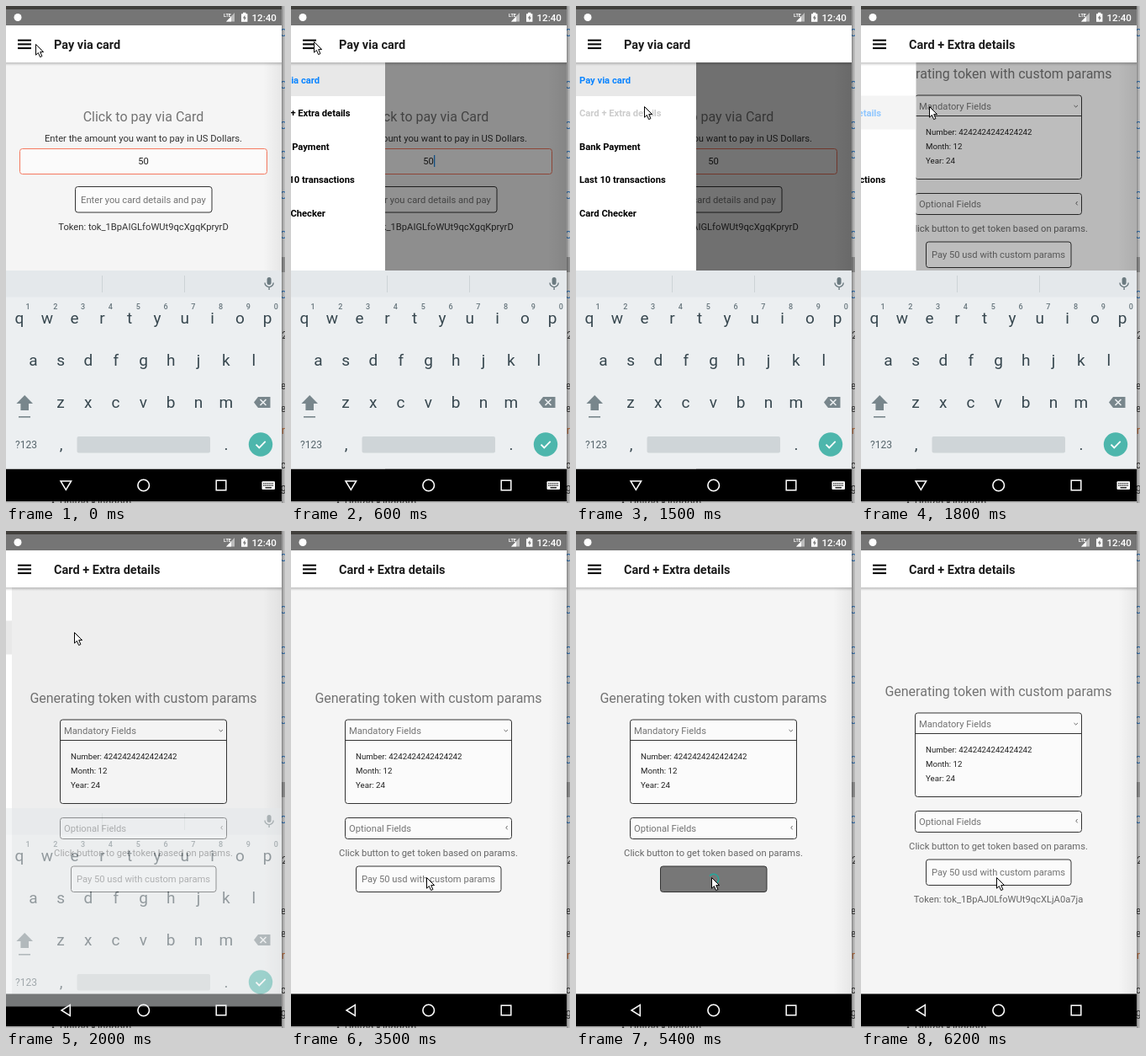
Write an HTML page that moves like this. It is 332 px wide and 590 px high and loops after 8 s.

```html
<!DOCTYPE html>
<html lang="en">
<head>
<meta charset="utf-8">
<title>Card payment demo</title>
<style>
  html, body { margin: 0; width: 100%; height: 100%; overflow: hidden; }
  svg { display: block; width: 332px; height: 590px; font-family: Roboto, "Noto Sans", sans-serif; }
  text { white-space: pre; }
</style>
</head>
<body>
<svg id="stage" viewBox="0 0 332 590" xmlns="http://www.w3.org/2000/svg"></svg>
<script>
const LOOP = 8000, STEP = 100;
const stage = document.getElementById('stage');

const rect = (x, y, w, h, fill, more = '') =>
  `<rect x="${x}" y="${y}" width="${w}" height="${h}" fill="${fill}" ${more}/>`;
const box = (x, y, w, h, stroke = '#333', fill = '#fbfbfb') =>
  rect(x + .5, y + .5, w - 1, h - 1, fill, `rx="3" stroke="${stroke}"`);
const text = (x, y, size, fill, str, more = '') =>
  `<text x="${x}" y="${y}" font-size="${size}" fill="${fill}" ${more}>${str}</text>`;
const MID = 'text-anchor="middle"', BOLD = 'font-weight="700"';
const mid = (x, y, size, fill, str, more = '') => text(x, y, size, fill, str, MID + ' ' + more);
const line = (d, stroke, width = 1) =>
  `<path d="${d}" fill="none" stroke="${stroke}" stroke-width="${width}"/>`;
const shape = (d, fill) => `<path d="${d}" fill="${fill}"/>`;
const group = (id, body) => `<g id="${id}">${body}</g>`;

// Slivers of the desktop behind the phone window
function desktop() {
  const links = [32, 94, 142, 177, 225, 272, 343]
    .map(y => mid(330, y + 4, 12, '#2464a4', 'C')).join('');
  const words = [[391, '-2'], [451, 'e'], [478, 'e'], [545, 'c'], [572, 'g']]
    .map(([y, s]) => mid(330, y + 4, 12, '#333', s)).join('');
  return rect(0, 0, 332, 590, '#b9b9b9') + rect(328, 298, 4, 18, '#8a8a8a') + links + words +
    mid(330, 508, 12, '#a65a2a', 'r') + text(54, 594, 12, '#333', '•  United Kingdom') +
    rect(328, 0, 2, 590, '#000', 'opacity=".18"');
}

function payPage() {
  return mid(163.5, 136.5, 16, '#737373', 'Click to pay via Card') +
    mid(163.5, 161, 11.2, '#333', 'Enter the amount you want to pay in US Dollars.') +
    box(16, 169, 295, 31, '#f5785f') + mid(163.5, 188, 11.2, '#222', '50') +
    rect(170, 177, 1.3, 14, '#1e88e5', 'id="caret"') +
    box(82, 214, 163.5, 31.5) + mid(163.5, 233.5, 11.2, '#737373', 'Enter you card details and pay') +
    mid(163.5, 266, 11.2, '#333', 'Token: tok_1BpAIGLfoWUt9qcXgqKpryrD');
}

function extraPage() {
  const facts = ['Number: 4242424242424242', 'Month: 12', 'Year: 24']
    .map((s, i) => text(77, 270.7 + 17 * i, 9.7, '#222', s)).join('');
  return mid(163.5, 203.5, 16, '#737373', 'Generating token with custom params') +
    box(64, 223.5, 199, 100.5) + line('M64 248.5H263', '#333') +
    text(69, 241, 11.2, '#737373', 'Mandatory Fields') + line('M253.5 236l2.2 2l2.2-2', '#555', .9) + facts +
    box(64, 340, 199, 26) + text(69, 357, 11.2, '#737373', 'Optional Fields') +
    line('M257.6 350l-1.8 2.2l1.8 2.2', '#555', .9) +
    mid(163.5, 386.2, 11.2, '#666', 'Click button to get token based on params.') +
    group('payButton', box(77, 397.5, 173.5, 31.5) + mid(163.5, 417, 11.2, '#737373', 'Pay 50 usd with custom params')) +
    group('busyButton', box(100, 397.5, 127.5, 31.5, '#333', '#777') +
      '<circle id="spinner" cx="163.7" cy="413.3" r="6" fill="none" stroke="#26a69a" stroke-width="1.6"/>') +
    group('token', mid(163.5, 449.2, 11.2, '#666', 'Token: tok_1BpAJ0LfoWUt9qcXLjA0a7ja'));
}

const ITEMS = ['Pay via card', 'Card + Extra details', 'Bank Payment', 'Last 10 transactions', 'Card Checker'];
const rowTop = i => 67 + 39.5 * i;

function drawer() {
  return rect(0, 67, 143, 483, '#fff') +
    ITEMS.map((s, i) => `<g class="item">${rect(0, rowTop(i), 143, 40, '#e8e8e8')}` +
      `${text(4, rowTop(i) + 24.5, 11.2, '#000', s, BOLD)}</g>`).join('');
}

function header() {
  return rect(0, 67, 328, 4, 'url(#drop)') + rect(0, 23, 328, 44, '#fff') +
    [39.7, 44.4, 49.1].map(y => rect(14, y, 16, 2, '#000')).join('') +
    text(57, 51, 14.5, '#1c1c1c', '', BOLD + ' id="title"');
}

function statusBar() {
  return rect(0, 0, 328, 4, '#413f3c') + rect(0, 4, 328, 19, '#757575') +
    '<circle cx="14" cy="13.5" r="4.5" fill="#fff"/>' +
    text(259, 12.5, 5.5, '#fff', 'LTE', BOLD) + shape('M272 8V18.5H262Z', '#bdbdbd') + shape('M268 12.5V18.5H262Z', '#fff') +
    shape('M280 9.2h2v-1.4h3.4v1.4h2v9.6h-7.4Z', '#fff') + shape('M284.4 10.8l-2.6 3.8h1.7v2.8l2.4-3.9h-1.5Z', '#757575') +
    text(292.5, 17.7, 11.6, '#fff', '12:40', 'font-weight="500"');
}

function navBar() {
  const dots = [0, 1, 2, 3, 4, 5].map(i =>
    rect(306.2 + 2.1 * i, 566.2, 1.2, 1.3, '#000') + rect(306.2 + 2.1 * i, 568.6, 1.2, 1.3, '#000')).join('');
  return rect(0, 549.5, 328, 38.5, '#000') +
    group('hideKey', line('M65 564H77.6L71.3 574.3Z', '#fff', 1.5) +
      rect(304.5, 564.3, 15.5, 9.8, '#fff', 'rx="1"') + dots + rect(308.5, 571.2, 7.5, 1.3, '#000')) +
    group('backKey', line('M76.3 562.6V575.4L66 569Z', '#fff', 1.5)) +
    '<circle cx="163.7" cy="569" r="6.8" fill="none" stroke="#fff" stroke-width="1.6"/>' +
    rect(250.2, 563.2, 11.6, 11.6, 'none', 'stroke="#fff" stroke-width="1.5"');
}

function keyboard() {
  const ink = '#37474f', soft = '#78868c';
  const keys = (str, x, y) => [...str].map((c, i) => mid(x + 32.8 * i, y, 19, ink, c)).join('');
  const digits = [...'1234567890'].map((c, i) => mid(26 + 32.8 * i, 360, 9, '#66757c', c, 'font-weight="500"')).join('');
  return rect(0, 314, 328, 235.5, '#eceff1') + rect(0, 314, 328, 31.5, '#e4e8eb') +
    line('M114.5 320V340M212.5 320V340', '#ccd3d6') +
    rect(310.6, 322, 5, 9, '#6b7a80', 'rx="2.5"') + line('M308 328.5a5 5 0 0 0 10.2 0M313.1 333.5V337', '#6b7a80', 1.4) +
    digits + keys('qwertyuiop', 16, 377) + keys('asdfghjkl', 32.3, 427) + keys('zxcvbnm', 65, 477) +
    shape('M22.2 462L32 472H27V480H17.4V472H12.4Z', soft) + rect(15, 487, 14, 1.6, soft) +
    shape('M295 470.5l5-6.5h14.5v13h-14.5Z', soft) + line('M302.5 467l7 7m0-7l-7 7', '#eceff1', 1.6) +
    mid(24, 525, 12, '#55646b', '?123') + mid(65.5, 527, 19, ink, ',') +
    rect(84.5, 511, 158.5, 19.5, '#cfd5d8', 'rx="2"') + mid(262, 527, 19, ink, '.') +
    '<circle cx="303" cy="520.5" r="14.2" fill="#4db6ac"/>' + line('M297.5 520.7l3.8 3.8l7.4-7.6', '#fff', 1.8);
}

stage.innerHTML = `<defs>
  <linearGradient id="drop" x2="0" y2="1"><stop stop-color="#000" stop-opacity=".22"/><stop offset="1" stop-color="#000" stop-opacity="0"/></linearGradient>
  <linearGradient id="edge"><stop stop-color="#000" stop-opacity="0"/><stop offset="1" stop-color="#000" stop-opacity=".06"/></linearGradient>
  <clipPath id="phone"><rect width="328" height="588"/></clipPath></defs>` +
  desktop() +
  `<g clip-path="url(#phone)">${rect(0, 23, 328, 527, '#f5f5f5')}` +
  group('pay', payPage()) + group('extra', extraPage()) +
  rect(306, 67, 22, 483, 'url(#edge)') + rect(0, 67, 328, 483, '#000', 'id="shade"') +
  group('drawer', drawer()) + header() + statusBar() + navBar() + group('keyboard', keyboard()) + '</g>' +
  group('pointer', '<path d="M.5 .5V13.2L3.4 10.5L5.6 15.6L7.9 14.6L5.7 9.6H9.6Z" fill="#fff" stroke="#000"/>');

const el = id => document.getElementById(id);
const show = (id, on) => el(id).setAttribute('display', on ? 'inline' : 'none');
const move = (id, x, y) => el(id).setAttribute('transform', `translate(${x} ${y})`);
const items = [...document.querySelectorAll('.item')];

// Linear interpolation through [time, value] points
function track(t, points) {
  let [t0, v0] = points[0];
  for (const [t1, v1] of points) {
    if (t < t1) return t0 === t1 ? v1 : v0 + (v1 - v0) * Math.max(0, t - t0) / (t1 - t0);
    [t0, v0] = [t1, v1];
  }
  return v0;
}

const DRAWER = [[400, 0], [500, 55], [600, 112], [700, 138], [800, 143], [1500, 143],
  [1600, 136], [1700, 106], [1800, 65.5], [1900, 29], [2000, 7], [2100, 0]];
const POINTER_X = [[100, 35], [300, 27], [900, 27], [1500, 81], [2000, 81], [2500, 153], [2700, 153], [3100, 161]];
const POINTER_Y = [[100, 45], [300, 42], [900, 42], [1500, 119], [1800, 119], [2000, 120],
  [2500, 251], [2700, 251], [3100, 418], [3300, 418], [3500, 411]];

function draw(t) {
  const onExtra = t >= 1600, typing = t < 1900;
  const busy = t >= 4600 && t < 6200, done = t >= 6200;

  show('pay', !onExtra);
  show('extra', onExtra);
  show('caret', t >= 600 && t < 1100);
  el('title').textContent = ITEMS[onExtra ? 1 : 0];

  move('extra', 0, typing ? -118 : done ? -8 : 0);
  show('payButton', !busy);
  show('busyButton', busy);
  show('token', done);
  const spin = Math.max(0, t - 4600);
  const arc = 1 + 13 * (1 - Math.cos(spin / 1330 * 2 * Math.PI));
  el('spinner').setAttribute('stroke-dasharray', `${arc} 40`);
  el('spinner').setAttribute('transform', `rotate(${spin * .36 - 70} 163.7 413.3)`);

  const open = track(t, DRAWER);
  show('drawer', open > 0);
  move('drawer', open - 143, 0);
  el('shade').setAttribute('opacity', .54 * open / 143);
  items.forEach((item, i) => {
    const active = i === (onExtra ? 1 : 0);
    item.firstChild.setAttribute('opacity', active ? 1 : 0);
    item.lastChild.setAttribute('fill', active ? '#0a84ff' : '#000');
  });
  items[1].setAttribute('opacity', track(t, [[1400, 1], [1500, .2], [1600, .2], [1800, .45], [2000, 1]]));

  const alpha = track(t, [[1800, 1], [1900, .85], [2000, .5], [2100, 0]]);
  show('keyboard', alpha > 0);
  el('keyboard').setAttribute('opacity', alpha);
  move('keyboard', 0, track(t, [[1800, 0], [1900, 4], [2000, 15], [2100, 30]]));
  show('hideKey', typing);
  show('backKey', !typing);

  move('pointer', track(t, POINTER_X), track(t, POINTER_Y));
}

const start = performance.now();
function tick() {
  const t = (performance.now() - start) % LOOP;
  draw(Math.floor(t / STEP) * STEP);
  requestAnimationFrame(tick);
}
tick();
</script>
</body>
</html>
```
